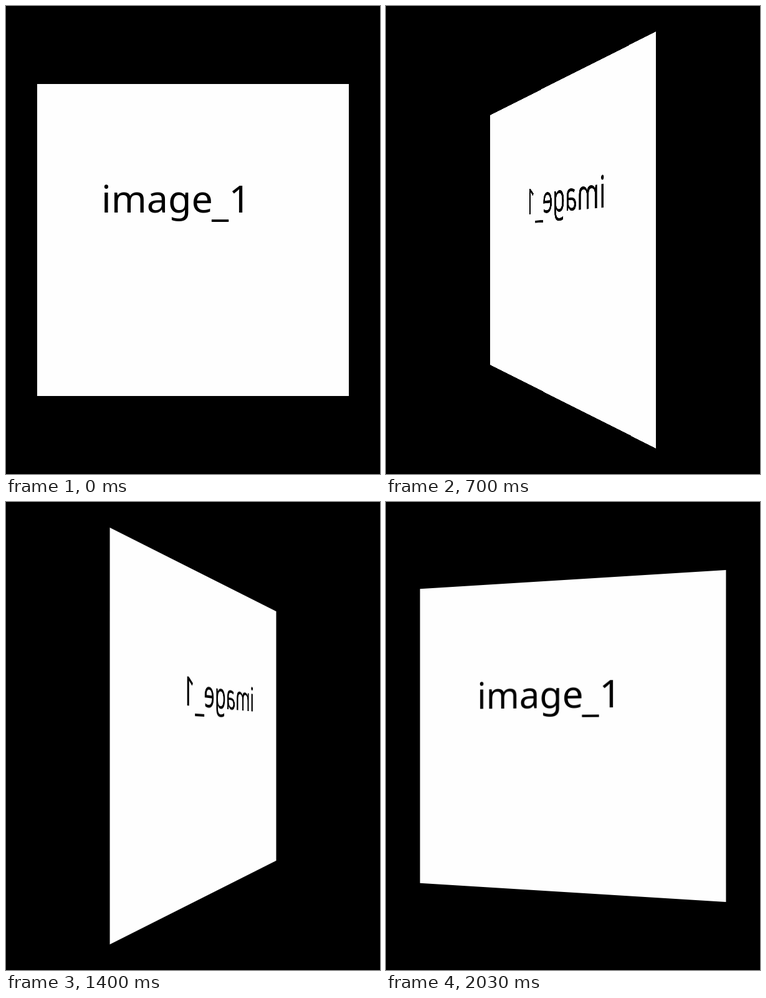
Write an HTML page that moves like this. It is 600 by 750 pixels and loops after 2100 ms.

```html
<!DOCTYPE html>
<html lang="en">
<head>
<meta charset="utf-8">
<title>Turning card</title>
<style>
  html, body { margin: 0; width: 100%; height: 100%; overflow: hidden; background: #000; }
  #card { position: absolute; left: 50px; top: 125px; width: 500px; height: 500px; background: #fefefe; }
  text { font: 61px "Noto Sans", "Open Sans", sans-serif; fill: #000; }
</style>
</head>
<body>
<svg id="card" viewBox="0 0 500 500">
  <text x="103" y="205.5">image<tspan dx="-2" dy="6">_</tspan><tspan dx="0.5" dy="-6">1</tspan></text>
</svg>
<script>
  const card = document.getElementById("card");
  const STEP = 70, STEPS = 30, HALF = 250, DEPTH = 860;

  function draw(now) {
    const step = Math.floor((now % (STEP * STEPS)) / STEP);
    const deg = step * 360 / STEPS;
    const angle = deg * Math.PI / 180;
    const a = HALF * Math.sin(angle) / DEPTH;
    // Keeps the projected card centred on the stage.
    const shift = HALF * Math.cos(angle) * a / (1 - a * a);
    card.style.transform = `translateX(${shift}px) perspective(${DEPTH}px) rotateY(${deg}deg)`;
  }

  let start;
  function tick(now) {
    start ??= now;
    draw(now - start);
    requestAnimationFrame(tick);
  }
  draw(0);
  requestAnimationFrame(tick);
</script>
</body>
</html>
```
